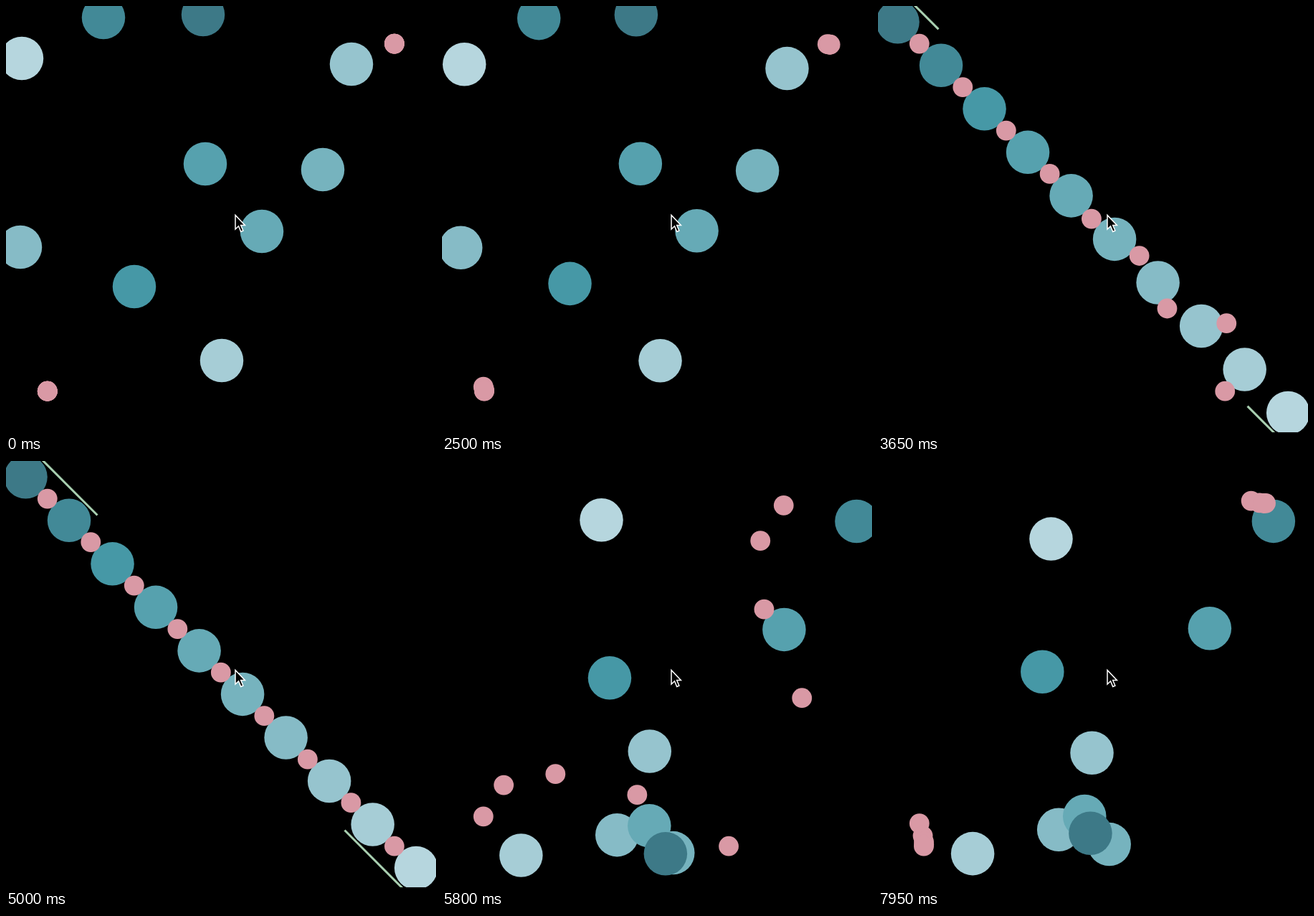
An HTML page with a canvas for the animation above (8000 ms loop, 600 by 595 pixels).

```html
<!DOCTYPE html>
<html lang="en">
<head>
<meta charset="utf-8">
<title>Diagonal and scatter</title>
<style>
  html, body { margin: 0; width: 100%; height: 100%; overflow: hidden; background: #000; }
  canvas { display: block; }
</style>
</head>
<body>
<canvas id="stage" width="600" height="595"></canvas>
<script>
const ctx = document.getElementById('stage').getContext('2d');

const LOOP = 8000;
const COUNT = 10;
const CELL = 60.52;
const BIG_RADIUS = CELL / 2;
const SMALL_RADIUS = 13.9;
const MOVE_TIME = 1000;
const STAGGER = 100;
const GATHER = 2340;
const CYCLE = 2666;
const RAIL_DELAY = 1014;

// Free resting points of the big discs, dark to light.
const firstScatter = [[275, 12], [136, 16], [179, 391], [278, 220], [357, 314],
                      [442, 228], [20, 336], [482, 81], [301, 494], [22, 73]];
const secondScatter = [[322, 566], [596, 84], [237, 308], [487, 236], [290, 517],
                       [322, 554], [239, 526], [284, 403], [96, 551], [210, 65]];

const clamp = x => Math.min(1, Math.max(0, x));
const cubicInOut = x => x < 0.5 ? 4 * x ** 3 : 1 - 4 * (1 - x) ** 3;
const progress = (t, start, duration) => cubicInOut(clamp((t - start) / duration));
const mix = (a, b, f) => a.map((v, i) => v + (b[i] - v) * f);
const cell = (column, row) => [27.5 + CELL * column, 22.3 + CELL * row];
const diagonal = k => cell(k, k);

function shade(k) {
  const dark = [61, 121, 135], middle = [70, 152, 166], light = [182, 214, 222];
  const rgb = k < 2 ? mix(dark, middle, k / 2) : mix(middle, light, (k - 2) / 7);
  return `rgb(${rgb.map(Math.round)})`;
}

// Scatter, diagonal and scatter again follow one another, one step per cycle.
function place(t, stops, duration) {
  const step = Math.max(0, Math.floor((t - GATHER) / CYCLE));
  return mix(stops[step], stops[step + 1], progress(t, GATHER + step * CYCLE, duration));
}

function disc([x, y], radius, color) {
  ctx.fillStyle = color;
  ctx.beginPath();
  ctx.arc(x, y, radius, 0, Math.PI * 2);
  ctx.fill();
}

// Two rails grow from opposite corners, then draw back.
function drawRails(t) {
  const start = GATHER + RAIL_DELAY;
  const grow = progress(t, start, MOVE_TIME) - progress(t, start + MOVE_TIME, MOVE_TIME);
  if (grow <= 0) return;
  const length = COUNT * CELL * grow;
  ctx.strokeStyle = '#a9d0b1';
  ctx.lineWidth = 3;
  for (const [x, y, sign] of [[21, -31, 1], [579, 621, -1]]) {
    ctx.beginPath();
    ctx.moveTo(x, y);
    ctx.lineTo(x + sign * length, y + sign * length);
    ctx.stroke();
  }
}

function drawCursor() {
  const outline = new Path2D('M320 291.5v19.5l4.5-4.2 3.2 7.6 3.2-1.4-3.2-7.4h5.7z');
  ctx.fillStyle = '#000';
  ctx.fill(outline);
  ctx.strokeStyle = '#fff';
  ctx.lineWidth = 1.5;
  ctx.stroke(outline);
}

function draw(t) {
  ctx.fillStyle = '#000';
  ctx.fillRect(0, 0, 600, 595);
  ctx.save();
  ctx.beginPath();
  ctx.rect(0, 0, 600, 594);
  ctx.clip();
  drawRails(t);
  for (let k = COUNT - 1; k >= 0; k--) {
    const stops = [firstScatter[k], diagonal(k), secondScatter[k], diagonal(k)];
    disc(place(t, stops, MOVE_TIME), BIG_RADIUS, shade(k));
  }
  for (let i = 0; i < COUNT - 1; i++) {
    const near = 0.5, far = COUNT - 1.5;
    const corner = i % 2 ? cell(far, near) : cell(near, far);
    const stops = [corner, diagonal(i + 0.5), corner, diagonal(i + 0.5)];
    disc(place(t, stops, MOVE_TIME + STAGGER * (i + 1)), SMALL_RADIUS, '#d999a5');
  }
  ctx.restore();
  drawCursor();
}

const start = performance.now();
function tick() {
  draw((performance.now() - start) % LOOP);
  requestAnimationFrame(tick);
}
tick();
</script>
</body>
</html>
```
